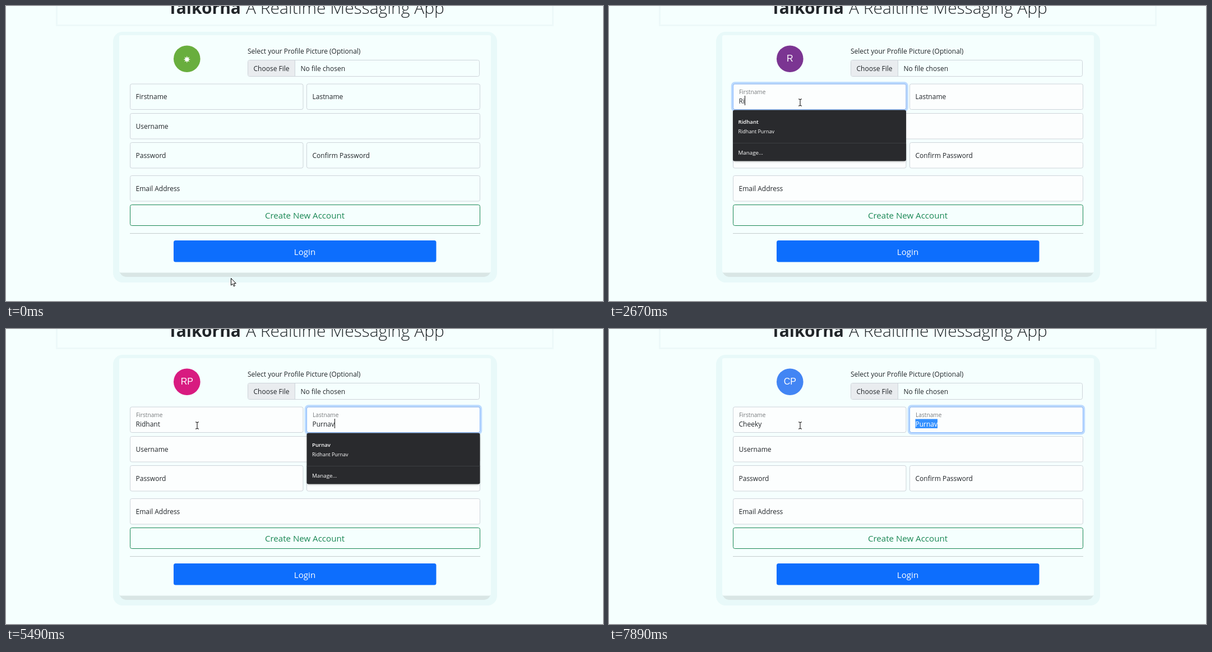
Animation of 1065 by 526 pixels, one loop 8 s. Source, as an HTML page:

```html
<!DOCTYPE html>
<html lang="en">
<head>
<meta charset="utf-8">
<title>Sign-up form</title>
<style>
  html, body { margin: 0; width: 100%; height: 100%; overflow: hidden; background: #f5fffe; }
  svg { display: block; width: 1065px; height: 526px; font: 12px 'Open Sans', 'Noto Sans', sans-serif; fill: #212529; }
  .heading { font-size: 30px; font-weight: 300; }
  .brand { font-weight: 700; }
  .button { font-size: 15.1px; text-anchor: middle; }
  .field { fill: transparent; stroke: #ced4da; }
  .ring { fill: none; stroke: #0d6efd; stroke-opacity: .25; stroke-width: 3.4; }
  .edge { fill: none; stroke: #86b7fe; }
  .avatar { font: 16px 'Liberation Sans', Arial, sans-serif; text-anchor: middle; fill: #fff; }
  .popup text { fill: #fff; font-size: 9px; }
  .popup .name { font-size: 9.6px; font-weight: 600; }
  .popup .manage { font-size: 9.8px; }
</style>
</head>
<body>
<svg id="stage" viewBox="0 0 1065 526">
  <defs>
    <filter id="soft" x="-5%" y="-5%" width="110%" height="115%"><feGaussianBlur stdDeviation="2"/></filter>
  </defs>
  <rect x="90.5" y="-20" width="885" height="54.5" fill="none" stroke="#edf9f9" stroke-width="3"/>
  <text class="heading brand" x="419" y="14" text-anchor="end">Talkorna</text>
  <text class="heading" x="428" y="14">A Realtime Messaging App</text>

  <rect x="191" y="46" width="685" height="447" rx="17" fill="#e8f9f9"/>
  <rect x="202" y="60" width="663" height="423" rx="13" fill="#d9e6e5"/>
  <rect x="202" y="52" width="663" height="423.5" rx="3" fill="#f5fffe"/>

  <circle id="disc" cx="322.8" cy="94.2" r="23.8"/>
  <path id="star" fill="#fff"/>
  <text id="initials" class="avatar" x="322.8" y="99"></text>

  <text x="431" y="85">Select your Profile Picture (Optional)</text>
  <rect class="field" x="431.5" y="96.5" width="413" height="29" rx="3"/>
  <path d="M434.5 97H515.5V125H434.5Q432 125 432 122.5V99.500Q432 97 434.500 97Z" fill="#e9ecef"/>
  <path d="M515.5 97V125" stroke="#ced4da"/>
  <text x="441.500" y="115.500">Choose File</text>
  <text x="525.500" y="115.500">No file chosen</text>

  <g id="fields"></g>

  <rect class="field" x="221.500" y="354.500" width="624" height="37" rx="3" style="stroke:#198754"/>
  <rect id="createHover" x="221.500" y="354.500" width="624" height="37" rx="3" fill="#198754"/>
  <text id="createText" class="button" x="533" y="379">Create New Account</text>
  <path d="M221 405.500H846" stroke="#c4cdcd"/>
  <rect x="299" y="418" width="468.500" height="38.500" rx="3.500" fill="#0d6efd"/>
  <rect id="loginHover" x="299" y="418" width="468.500" height="38.500" rx="3.500" fill="#0b5ed7"/>
  <text class="button" x="533" y="443.500" fill="#fff">Login</text>

  <g id="popup" class="popup">
    <rect x="1" y="187" width="307" height="90" rx="3" fill="#000" opacity=".3" filter="url(#soft)"/>
    <rect x="0" y="185.500" width="309" height="91" rx="3" fill="#292a2d"/>
    <path d="M0 244.500H309" stroke="#3c4043"/>
    <text id="hintName" class="name" x="9.500" y="210"></text>
    <text id="hintFull" x="9.500" y="226.500"></text>
    <text class="manage" x="9.500" y="264.500">Manage...</text>
  </g>

  <g id="pointer" stroke-linejoin="round">
    <path id="arrow" d="M0 0V12.500L2.900 9.800L4.900 14.300L6.900 13.400L5 9.100H8.800Z" fill="#fff" stroke="#000"/>
    <path id="hand" d="M-1.500 0.500Q0 -1 1.500 0.500V5L7 6.500Q8.500 7 8 9L6.500 14.500H-1.500L-5.500 9Q-5.500 6.500 -3.500 7.500L-1.500 9Z" fill="#fff" stroke="#000"/>
    <g id="beam" fill="none">
      <path d="M-3 -6H-1L0 -5L1 -6H3M0 -5V5M-3 6H-1L0 5L1 6H3" stroke="#fff" stroke-width="2.500" opacity=".7"/>
      <path d="M-3 -6H-1L0 -5L1 -6H3M0 -5V5M-3 6H-1L0 5L1 6H3" stroke="#000"/>
    </g>
  </g>
</svg>
<script>
const LOOP = 8000;
const $ = id => document.getElementById(id);
const set = (node, attrs) => { for (const k in attrs) node.setAttribute(k, attrs[k]); return node; };
const make = (tag, parent, attrs, text = '') => {
  const node = set(document.createElementNS('http://www.w3.org/2000/svg', tag), attrs);
  node.textContent = text;
  return parent.appendChild(node);
};
const show = (node, on) => { node.style.display = on ? '' : 'none'; };
const ramp = (t, from, to) => Math.max(0, Math.min(1, (t - from) / (to - from)));
const smooth = u => u * u * (3 - 2 * u);
const at = (steps, t) => {
  let value = steps[0].slice(1);
  for (const [time, ...rest] of steps) if (time <= t) value = rest;
  return value;
};
const typed = (word, times) => times.map((time, i) => [time, word.slice(0, i + 1)]);

const NAME = 'Ridhant', LAST = 'Purnav', NICK = 'Cheeky';
const texts = {
  first: [[0, ''], ...typed(NAME, [2270, 2640, 3010, 3090, 3280, 3400, 3510]),
          ...typed(NICK, [6340, 6590, 6920, 7160, 7280, 7400])],
  last: [[0, ''], ...typed(LAST, [4380, 4790, 4910, 5150, 5290, 5430])]
};
const avatars = [
  [0, '', '#69ae3e'], [2310, 'R', '#0288d1'], [2670, 'R', '#7b3592'], [3050, 'R', '#00897b'],
  [3130, 'R', '#f4511e'], [3320, 'R', '#5c6bc0'], [3440, 'R', '#689f38'], [3560, 'R', '#ff4081'],
  [4430, 'RP', '#0097a7'], [4850, 'RP', '#ef6c00'], [4970, 'RP', '#5e35b1'], [5210, 'RP', '#43a047'],
  [5490, 'RP', '#d81b80'], [6400, 'CP', '#ec407a'], [6650, 'CP', '#00897b'], [6980, 'CP', '#7b3592'],
  [7210, 'CP', '#f4511e'], [7330, 'CP', '#689f38'], [7450, 'CP', '#4285f4']
];
const carets = [[0, ''], [1570, 'first'], [2090, ''], [2270, 'first'], [3860, 'last'],
                [5920, ''], [6340, 'first'], [7730, '']];
const selections = [[0, ''], [5920, 'first'], [6340, ''], [7730, 'last']];
const popups = [[0, ''], [1610, 'first', NAME, `${NAME} ${LAST}`], [3860, ''],
                [4480, 'last', LAST, `${NAME} ${LAST}`], [5920, ''],
                [6360, 'first', NICK, `${NICK} Ferret`], [7730, '']];

const fields = [
  ['Firstname', 221.5, 139, 308.5, 'first'], ['Lastname', 536.5, 139, 309, 'last'],
  ['Username', 221.5, 191.5, 624], ['Password', 221.5, 243.5, 308.5],
  ['Confirm Password', 536.5, 243.5, 309], ['Email Address', 221.5, 302.5, 624]
].map(([label, x, y, width, id]) => {
  const box = { x, y, width, height: 45.5, rx: 3 };
  const f = { id, x: x + 10, y };
  if (id) f.ring = make('rect', $('fields'), { ...box, x: x - 2, y: y - 2, width: width + 4, height: 49.5, rx: 5, class: 'ring' });
  f.box = make('rect', $('fields'), { ...box, class: 'field' });
  if (id) {
    f.edge = make('rect', $('fields'), { ...box, class: 'edge' });
    f.mark = make('rect', $('fields'), { x: f.x, y: 160.5, height: 16.5, fill: '#3390ff' });
    f.text = make('text', $('fields'), { x: f.x, y: 173.5 });
    f.caret = make('rect', $('fields'), { y: 160, width: 1, height: 17, fill: '#111' });
  }
  f.label = make('text', $('fields'), { transform: `translate(${f.x} ${y + 27})` }, label);
  return f;
});

const spikes = Array.from({ length: 16 }, (_, i) => {
  const a = i * Math.PI / 8, r = i % 2 ? 3 : 6.2;
  return `${(322.8 + r * Math.sin(a)).toFixed(2)} ${(95.2 - r * Math.cos(a)).toFixed(2)}`;
});
set($('star'), { d: `M${spikes.join('L')}Z` });

function drawInput(f, t) {
  const toLast = ramp(t, 3870, 4020) - ramp(t, 5920, 6070) + ramp(t, 7740, 7880);
  const isFirst = f.id === 'first';
  const glow = isFirst ? ramp(t, 1590, 1710) - toLast : toLast;
  const lift = smooth(isFirst ? ramp(t, 1570, 1625) : ramp(t, 3870, 3960));
  set(f.ring, { opacity: glow });
  set(f.edge, { opacity: glow });
  set(f.label, {
    transform: `translate(${f.x + lift * .5} ${166 - 9 * lift}) scale(${1 - .15 * lift})`,
    opacity: 1 - .4 * lift
  });
  f.text.textContent = at(texts[f.id], t)[0];
  const width = f.text.textContent ? f.text.getComputedTextLength() : 0;
  const selected = at(selections, t)[0] === f.id;
  show(f.mark, selected);
  set(f.mark, { width });
  set(f.text, { fill: selected ? '#fff' : '#212529' });
  show(f.caret, at(carets, t)[0] === f.id);
  set(f.caret, { x: Math.round(f.x + width) });
}

function drawPointer(t) {
  const u = smooth(t < 580 ? 0 : Math.min(1, (Math.floor((t - 580) / 36) + 1) / 16));
  const x = t < 430 ? 401.5 : 400 * (1 - u) ** 2 + 2 * 394 * u * (1 - u) + 341 * u * u;
  const y = t < 430 ? 485.5 : 464.5 - 292.5 * u;
  const inside = (top, height) => y >= top && y <= top + height;
  const hand = inside(418, 38) || inside(354, 38);
  const beam = fields.some(f => inside(f.y, 46));
  show($('hand'), hand);
  show($('beam'), beam);
  show($('arrow'), !hand && !beam);
  set($('pointer'), { transform: `translate(${x} ${y})` });
}

function draw(t) {
  const [initials, colour] = at(avatars, t);
  set($('disc'), { fill: colour });
  $('initials').textContent = initials;
  show($('star'), !initials);

  for (const f of fields) {
    f.box.style.fill = t < 850 ? 'transparent' : '#fcfefe';
    if (f.id) drawInput(f, t);
  }

  const create = .4 * (ramp(t, 750, 810) - ramp(t, 810, 960));
  set($('createHover'), { opacity: create });
  set($('createText'), { fill: create > .25 ? '#fff' : '#198754' });
  set($('loginHover'), { opacity: .6 * (ramp(t, 630, 720) - ramp(t, 720, 870)) });

  const [owner, name, full] = at(popups, t);
  show($('popup'), owner);
  if (owner) {
    set($('popup'), { transform: `translate(${owner === 'first' ? 221 : 536.5} 0)` });
    $('hintName').textContent = name;
    $('hintFull').textContent = full;
  }
  drawPointer(t);
}

const start = performance.now();
function tick() {
  draw((performance.now() - start) % LOOP);
  requestAnimationFrame(tick);
}
tick();
</script>
</body>
</html>
```
